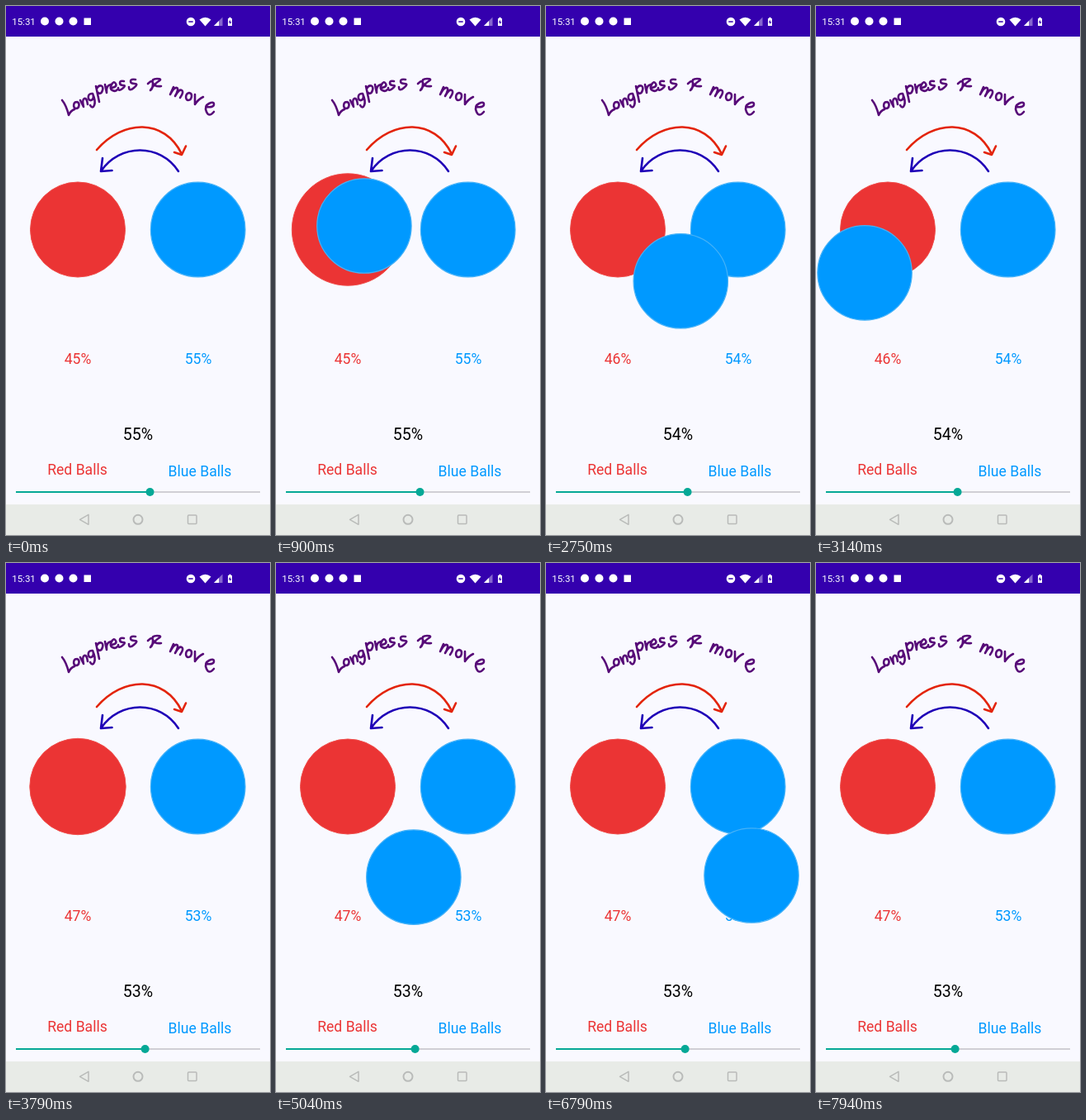
Recreate the animation shown at these times as an HTML page. Size 320x640 px, loop 8 s.

```html
<!DOCTYPE html>
<html lang="en">
<head>
<meta charset="utf-8">
<title>Long press and move</title>
<style>
  html, body { margin: 0; width: 100%; height: 100%; overflow: hidden; }
  svg { display: block; width: 100vw; height: 100vh; }
  text { font-family: Roboto, sans-serif; font-size: 17.6px; text-anchor: middle; }
  .line { fill: none; stroke-width: 2.6; stroke-linecap: round; stroke-linejoin: round; }
  .red { fill: #eb3434; }
  .blue { fill: #0099ff; }
  circle.red { stroke: #f04c4a; }
  circle.blue { stroke: #45b2f8; stroke-width: 1.2; }
</style>
</head>
<body>
<svg viewBox="0 0 320 640">
  <rect width="320" height="640" fill="#f9f9ff"/>
  <rect width="320" height="37" fill="#3400ae"/>

  <g fill="#fff">
    <text x="21.5" y="23" style="font-size:11.5px">15:31</text>
    <circle cx="47" cy="18.5" r="5"/>
    <circle cx="64.5" cy="18.5" r="5"/>
    <circle cx="81.5" cy="18.5" r="5"/>
    <rect x="94.5" y="14.5" width="8.5" height="8.5"/>
    <circle cx="224" cy="19" r="5.3"/>
    <path d="M221.3 19h5.4" stroke="#3400ae" stroke-width="1.5"/>
    <path d="M234.5 16.5q7-5.5 14 0l-7 8z"/>
    <path d="M262.5 13.5v10.5h-10.5z" opacity=".4"/>
    <path d="M258 18v6h-6z"/>
    <path d="M269 15h1.300v-1.200h2.400v1.200h1.300v9h-5z"/>
    <path d="M271.800 16.500l-2 3.500h1.500v2.500l2-3.500h-1.500z" fill="#3400ae"/>
  </g>

  <path class="line" stroke="#570a78" d="M68 114q5 6 8 18q2-5 7-7
    M86 116c-5 0-5 8-1 8s5-7 1-8 M90 114l4 8q-2-9 1-10t4 7
    M104 106c-6 0-5 9-1 8s3-6 2-8q4 9 2 14t-5 0
    M109 97l4 19 M110 100c3-6 9-4 7 2s-5 3-5 3 M120 95l2 10q-1-9 5-10
    M128 99q7-1 5-5t-5 1t1 7t6-1 M143 91q-5-1-5 2t4 3t-1 4t-5-1
    M157 89q-6-1-6 2t5 3t-1 5t-6-1
    M172 94q6-6 6 0t-3 8q5-8 10-11t-2-3t-5 5t10 4
    M203 98l-4 9q5-9 8-8t-2 10q5-9 8-7t-2 9
    M222 105c-5 1-5 9-1 9s6-8 1-9 M229 107v12q4-6 10-9
    M243 122q9 1 9-3t-6-1t-3 10t9 0"/>
  <path class="line" stroke="#e3240b" d="M110 174C142 137 192 136 213 179M204 177l9 3l5-10.500"/>
  <path class="line" stroke="#1f00b7" d="M209 200C187 166 138 166 115 200M117 184l-2 16l13.500-1"/>

  <circle id="redBall" class="red" cx="87" cy="270.5" r="57.5"/>
  <circle class="blue" cx="232.700" cy="270.5" r="57.3"/>
  <text id="redShare" class="red" x="87" y="433"></text>
  <text id="blueShare" class="blue" x="233" y="433"></text>
  <text id="total" x="160" y="525" style="font-size:19.6px"></text>
  <text class="red" x="86.500" y="566.500">Red Balls</text>
  <text class="blue" x="235" y="568.500">Blue Balls</text>

  <path d="M12 588H308" stroke="#d0cfd5" stroke-width="2"/>
  <path id="progress" stroke="#05a896" stroke-width="2"/>
  <circle id="thumb" cy="588" r="5" fill="#05a896"/>

  <rect y="603" width="320" height="37" fill="#e8ebe7"/>
  <g fill="none" stroke="#b9bbb9" stroke-width="1.5" stroke-linejoin="round">
    <path d="M89.500 621.300l10.500-6v12z"/>
    <circle cx="160" cy="621.300" r="5.500" stroke-width="2"/>
    <rect x="220.500" y="616" width="10.500" height="10.500" rx="1"/>
  </g>
  <circle id="dragged" class="blue" r="57.2"/>
</svg>
<script>
const LOOP = 8000;
const $ = id => document.getElementById(id);

// Each drag: [time, x, y] points, visible from the first time to the last
const drags = [
  [[280, 240, 274], [550, 240, 274], [700, 180, 269], [900, 107, 266], [1100, 92, 269], [1290, 90, 270]],
  [[2200, 246, 294], [2400, 238, 302], [2700, 180, 332], [2950, 98, 336], [3140, 59, 323], [3350, 70, 295], [3640, 87, 272]],
  [[4640, 232, 271], [4840, 230, 275], [5040, 167, 380], [5250, 140, 397], [5400, 145, 395], [5690, 232, 271]],
  [[6340, 254, 290], [6690, 254, 300], [6790, 249, 378], [7100, 262, 385], [7300, 275, 370], [7530, 272, 360]]
];
// The red ball swells while the drag is over it: [enter, drop]
const hovers = [[740, 1290], [3230, 3640]];

const clamp = v => Math.max(0, Math.min(1, v));
const ramp = (t, start, length) => {
  const p = clamp((t - start) / length);
  return p * p * (3 - 2 * p);
};

function position(points, t) {
  const i = points.findIndex(p => p[0] > t);
  const [t0, x0, y0] = points[i - 1], [t1, x1, y1] = points[i];
  const p = (t - t0) / (t1 - t0);
  return [x0 + (x1 - x0) * p, y0 + (y1 - y0) * p];
}

function draw(t) {
  const drag = drags.find(d => t >= d[0][0] && t < d[d.length - 1][0]);
  const ball = $("dragged");
  ball.style.display = drag ? "" : "none";
  if (drag) {
    const [x, y] = position(drag, t);
    ball.setAttribute("cx", x);
    ball.setAttribute("cy", y);
  }

  const swell = hovers.reduce((sum, [enter, drop]) => sum + ramp(t, enter, 150) - ramp(t, drop, 180), 0);
  $("redBall").setAttribute("r", 57.5 + 10.2 * swell);

  const blue = 55 - hovers.filter(h => t >= h[1]).length;
  $("redShare").textContent = 100 - blue + "%";
  $("blueShare").textContent = $("total").textContent = blue + "%";
  const x = 12 + 2.955 * blue;
  $("thumb").setAttribute("cx", x);
  $("progress").setAttribute("d", `M12 588H${x}`);
}

const start = performance.now();
function tick() {
  draw((performance.now() - start) % LOOP);
  requestAnimationFrame(tick);
}
tick();
</script>
</body>
</html>
```
